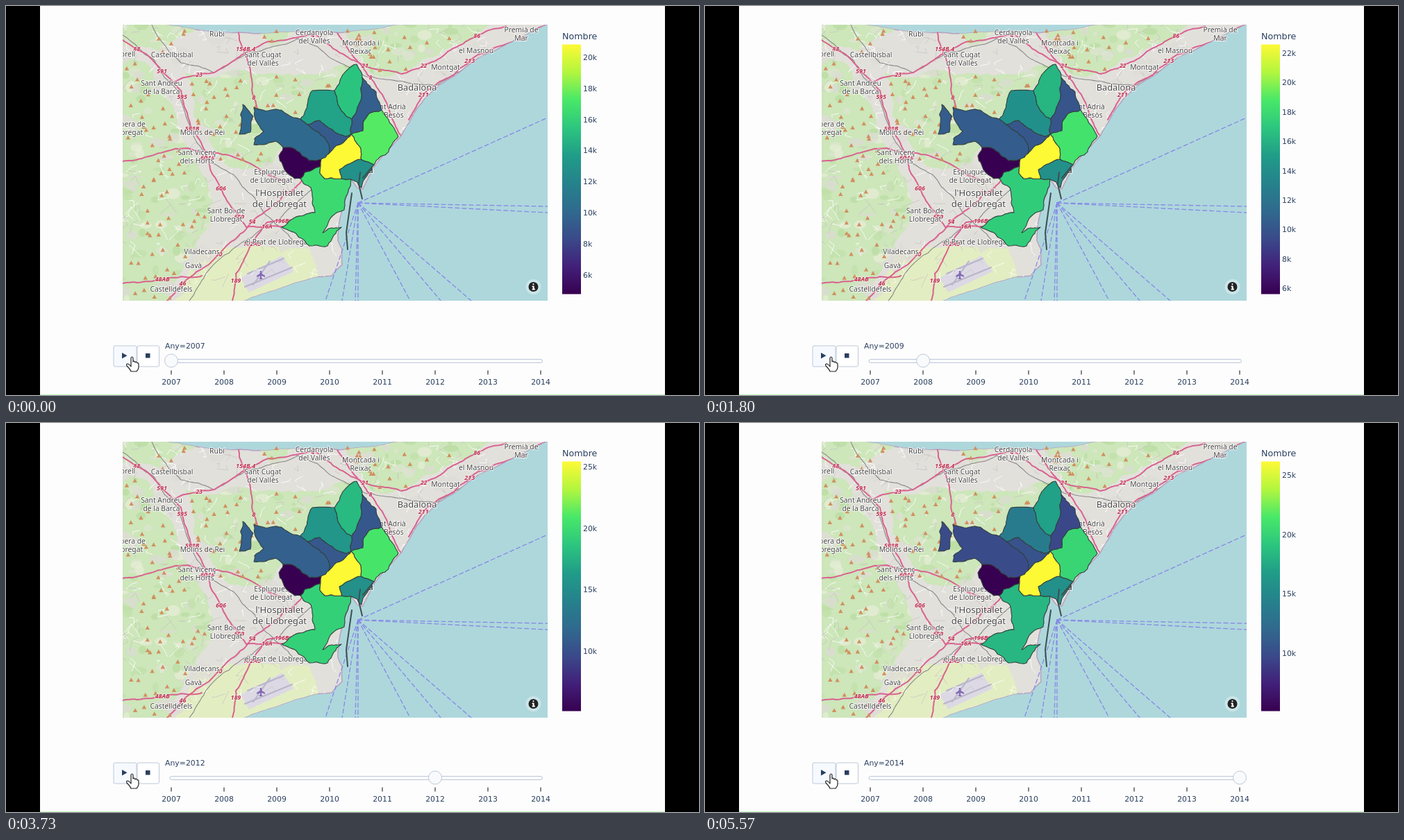
Write an HTML page that moves like this. It is 998 px wide and 561 px high and loops after 5610 ms.

```html
<!DOCTYPE html>
<html lang="ca">
<head>
<meta charset="utf-8">
<style>
  html, body { margin: 0; height: 100%; overflow: hidden; background: #000; }
  svg { display: block; width: 998px; height: 561px; }
  text { font-family: "DejaVu Sans", Verdana, sans-serif; font-size: 10.9px; fill: #2a3f5f; }
  .mid { text-anchor: middle; }
  #places text, #refs text { font-family: "Noto Sans", sans-serif; text-anchor: middle; paint-order: stroke; stroke-linejoin: round; }
  #places text { fill: #484848; stroke: #fffc; stroke-width: 2px; }
  #refs text { fill: #bd3050; stroke: #fff9; stroke-width: 1.6px; font: italic 600 9px "Noto Sans", sans-serif; }
  .line { fill: none; stroke-linejoin: round; stroke-linecap: round; }
  #districts path { stroke: #33413f; stroke-width: 1.1; stroke-linejoin: round; }
</style>
</head>
<body>
<svg viewBox="0 0 998 561">
  <defs>
    <clipPath id="frame"><path d="M168 27H780V425H168Z"/></clipPath>
    <clipPath id="inWoods"><use href="#woods"/></clipPath>
    <clipPath id="inLand"><use href="#land"/></clipPath>
    <linearGradient id="scale" x1="0" y1="1" x2="0" y2="0"></linearGradient>
  </defs>
  <path fill="#fdfdfd" d="M49 0H949V561H49Z"/>
  <path fill="#c4ffc0" d="M49 560H949V561H49Z"/>

  <g clip-path="url(#frame)">
    <path fill="#aed7dc" d="M168 27H780V425H168Z"/>
    <path id="land" fill="#e2e0db" stroke="#b5a2c0" stroke-width="1.5"/>
    <g clip-path="url(#inLand)">
      <path id="woods" fill="#cde6ba"/>
      <g id="patches" clip-path="url(#inWoods)"></g>
      <path id="delta" fill="#e3edc2"/>
      <g id="towns" fill="#dfdcd8" opacity=".8"></g>
      <path fill="#dcd9e5" d="M338 392 398 360 414 383 350 413Z"/>
      <path class="line" stroke="#b8b5ca" stroke-width="2" d="M344 405 412 377M348 386 400 364M356 402 380 368"/>
      <g id="streets" class="line" stroke-width=".8"></g>
      <g id="roads" class="line"></g>
    </g>
    <g id="peaks" fill="#d0905f"></g>
    <path fill="#8269b5" transform="translate(367 388)" d="M-1-6H1L1.5-2 6 1V3L1 1V4L3 6H-3L-1 4V1L-6 3V1L-1.5-2Z"/>
    <g id="refs"></g>
    <g id="places"></g>
    <g id="ferries" class="line" stroke="#8589e5" stroke-width="1.3" stroke-dasharray="6 4"></g>
    <g id="districts"></g>
    <path class="line" stroke="#3e5050" stroke-width="2" d="M510 240 508 257 513 278M498 270 490 327 492 351M528 231 514 248"/>
    <circle cx="759.5" cy="405" r="11" fill="#fff" opacity=".35"/>
    <circle cx="759.5" cy="405" r="7" fill="#222"/>
    <path class="line" stroke="#fff" stroke-width="2" d="M759.500 401V401.200M758.500 404.500H759.700V408.300M758.500 408.500H761"/>
  </g>

  <text x="801" y="48" style="font-size:12.7px">Nombre</text>
  <path fill="url(#scale)" d="M801 55.5H828V415.5H801Z"/>
  <g id="ticks"></g>

  <g stroke="#bec8d9">
    <rect x="155" y="490" width="33" height="30" rx="2" fill="#f6faff"/>
    <rect x="189" y="490" width="31.5" height="30" rx="2" fill="#fff"/>
    <rect x="236" y="509.5" width="536.5" height="5" rx="2.5" fill="#f8fafc"/>
  </g>
  <path fill="#2a3f5f" d="M167 500 174.5 504.2 167 508.5ZM201 501H207.500V507.500H201Z"/>
  <text id="label" x="229" y="494"></text>
  <g id="years"></g>
  <circle id="grip" cy="511.500" r="9.500" fill="#f8fafc" stroke="#bec8d9"/>
  <path fill="#fff" stroke="#222" stroke-width="1.2" stroke-linejoin="round" d="M180 518V508Q180 506 181.500 506T183 508V513Q185 511 186 514 188 512 189 515 191 514 191 517V521Q191 524 188 527H180Q179 524 174 519 173 516 175 516 177 516 180 520Z"/>
</svg>

<script>
const $ = id => document.getElementById(id);
const fill = (id, items, draw) => $(id).innerHTML = items.map(draw).join('');
const range = n => [...Array(n).keys()];
const clamp = (v, a, b) => Math.max(a, Math.min(b, v));
const points = s => s.split(' ').map(p => p.split(',').map(Number));

let seed = 7;
const rand = () => (seed = seed * 16807 % 2147483647) / 2147483647;
const between = (a, b) => (a + rand() * (b - a)).toFixed(1);
const pick = list => list[Math.floor(rand() * list.length)];

// Midpoint displacement that depends only on place, so neighbours share a border exactly
const noise = (x, y) => {
  const s = Math.sin(x * 12.9898 + y * 78.233) * 43758.5453;
  return s - Math.floor(s) - .5;
};
function rough([ax, ay], [bx, by], wobble) {
  const size = Math.hypot(bx - ax, by - ay), x = (ax + bx) / 2, y = (ay + by) / 2;
  if (size < 6) return [[bx, by]];
  const mid = [x + noise(x, y) * size * wobble, y + noise(y, x) * size * wobble];
  return [...rough([ax, ay], mid, wobble), ...rough(mid, [bx, by], wobble)];
}
function trace(list, wobble) {
  const line = list.slice(1).flatMap((p, i) => rough(list[i], p, wobble));
  return 'M' + [list[0], ...line].map(p => p.map(v => v.toFixed(1))).join(' ');
}
const area = (list, wobble = .22) => trace([...list, list[0]], wobble) + 'Z';

// Terrain
$('land').setAttribute('d', area(points('160,20 790,22 745,43 680,75 625,113 590,151 570,186 530,232 514,264 506,262 497,250 488,281 481,306 478,338 484,351 484,373 469,389 444,391 342,425 320,435 160,435'), .06));
$('woods').setAttribute('d', [
  '160,75 205,85 246,158 280,238 298,300 262,362 232,435 160,435',
  '258,96 345,93 480,85 505,84 425,160 380,236 320,232 270,160',
  '480,20 700,20 620,72 530,100',
  '160,20 285,20 224,66 160,58',
  '330,20 430,20 388,62'
].map(s => area(points(s))).join(''));
$('delta').setAttribute('d', area(points('276,354 352,346 437,350 450,390 342,430 240,430'), .1));

fill('patches', range(420), () =>
  `<ellipse cx="${between(168, 680)}" cy="${between(27, 425)}" rx="${between(2, 12)}" ry="${between(2, 8)}" fill="${pick(['#b9dda2', '#dfe6d2', '#e9eed9', '#c0e2aa', '#dddcd5'])}" opacity=".7"/>`);
fill('streets', range(420), () =>
  `<path stroke="${pick(['#fff', '#fff', '#c8c6c3'])}" d="M${between(168, 700)} ${between(27, 400)}l${between(-16, 16)} ${between(-14, 14)} ${between(-8, 8)} ${between(-8, 8)}"/>`);

const spot = $('woods').ownerSVGElement.createSVGPoint();
const inWoods = ([x, y]) => {
  spot.x = x;
  spot.y = y;
  return $('woods').isPointInFill(spot);
};
fill('peaks', range(420).map(() => [between(172, 660), between(30, 418)]).filter(inWoods),
  ([x, y]) => `<path d="M${x} ${y}l3.2 5.800h-6.400Z"/>`);

// Roads carry their numbers at equal distances
const roads = [
  ['168,42 248,124 290,220 420,345'],
  ['210,27 252,82 300,96 420,47 520,102 622,114 780,28'],
  ['264,425 330,348 454,252'],
  ['168,49 205,72 252,122 262,160 296,240 346,319 400,318', '88 591 595 598B 604A 606 609 16A'],
  ['232,425 292,373 344,324 430,246', '46 50 54 195B'],
  ['326,425 331,386 376,312 426,304', '189 192AB 196B'],
  ['168,224 226,211 262,205 328,218 400,252', ''],
  ['236,112 300,96 380,51 446,42 512,84 570,98 668,48 720,29', '23 4 4 21 22 86'],
  ['332,27 354,106 367,166', '154B 8'],
  ['471,27 516,92 552,151 568,186', '4 8 26'],
  ['580,164 600,130 680,70 780,27', '211 213 23'],
  ['168,400 220,395 282,389', '48AB']
];
fill('roads', roads, ([line, refs]) =>
  `<path stroke="${refs == null ? '#888' : '#d9628f'}" stroke-width="${refs == null ? 1.1 : 2}" d="${trace(points(line), .12)}"/>`);
$('refs').innerHTML = roads.map(([, refs], k) => {
  const path = $('roads').children[k], names = refs ? refs.split(' ') : [];
  return names.map((name, i) => {
    const { x, y } = path.getPointAtLength(path.getTotalLength() * (i + .5) / names.length);
    return `<text x="${x}" y="${y + 3}">${name}</text>`;
  }).join('');
}).join('');

const places = "Rubí,304,40|Cerdanyola/del Vallès,444,38|Montcada i/Reixac,511,53|Premià de/Mar,742,34|el Masnou,677,64|Montgat,633,88|Badalona,592,118,12.8|Sant Adrià/de Besòs,551,145|Castellbisbal,239,70|Sant Cugat/del Vallès,370,70|Martorell,164,69|Sant Andreu/de la Barca,224,111|Corbera de/Llobregat,174,170|Molins de Rei,283,182|Sant Vicenç/dels Horts,275,211|Esplugues/de Llobregat,382,239|l'Hospitalet/de Llobregat,394,269,13.2|Sant Boi de/Llobregat,317,295|el Prat de Llobregat,391,340|Viladecans,282,354|Gavà,270,374|Castelldefels,238,408|Barcelona,494,236,15"
  .split('|').map(s => s.split(','));
fill('places', places, ([name, x, y, size = 10.3]) => name.split('/').map((line, i) =>
  `<text x="${x}" y="${+y + i * size * 1.25}" dy=".35em" style="font-size:${size}px">${line}</text>`).join(''));
fill('towns', places, ([, x, y]) => `<path d="${area([[x - 22, y - 4], [+x, y - 13], [+x + 24, +y], [+x + 4, +y + 16]], .4)}"/>`);

fill('ferries', points('780,161 780,289 780,298 582,425 626,425 670,425 503,425 507,425 484,425 460,425'),
  ([x, y]) => `<path d="M507 284 ${x} ${y}"/>`);

// Districts: corners by letter, then outline, place on the scale and response to the yearly dip
const corners = Object.fromEntries(
  'A505,84 B513,103 C533,124 D541,150 E523,155 F565,188 G530,229 H511,221 I497,185 K514,180 L498,163 M509,140 N478,142 O473,122 P485,99 Q441,122 R424,163 S434,171 T452,165 U470,178 V489,188 W486,197 X465,213 Y463,196 Z454,221 a452,241 b453,231 c459,249 d483,249 e480,236 f511,206 g437,223 h417,207 i399,204 j388,195 k371,200 l357,200 m358,191 n371,181 o361,167 p357,146 q370,150 r396,150 s393,216 t401,236 u416,249 v424,249 w430,240 x439,262 y441,284 z445,298 0397,319 1437,346 2463,346 3483,319 4469,320 5456,327 6470,303 7487,294 8488,280 9497,250 @512,262 !341,142 #356,159 $352,182 %336,185'
    .split(' ').map(s => [s[0], s.slice(1).split(',').map(Number)]));
const districts = {
  'Sarrià': ['pqrRSYXZghijklmno !#$%', .33, 1],
  'Gràcia': ['STUVIWXY', .28, .3],
  'Horta': ['ONLIVUTSRQ', .57, 1.5],
  'Nou Barris': ['ABMLNOP', .66, .9],
  'Sant Andreu': ['BCDEKILM', .29, .7],
  'Sant Martí': ['EDFGHfIK', .79, .7],
  'Ciutat Vella': ['HG@9de', .5, 0],
  'Sants': ['bacd987654321' + '0zyxvw', .73, 1],
  'Les Corts': ['ihgZbwvuts', 0, 0],
  'Eixample': ['IfHedcabZXW', 1, 0]
};
const outline = names => names.split(' ').map(ring => area([...ring].map(c => corners[c]))).join('');
fill('districts', Object.values(districts), ([names]) => `<path d="${outline(names)}"/>`);

// Lowest and highest value in thousands and the dip of the middle values;
// a missing year lies halfway between its neighbours
const years = [[4.77, 20.82, 0], , [5.6, 22.6, .045], [6.22, 27.3, .065], , [5.17, 25.4, .03], , [5.12, 26.17, .105]];
const yearAt = i => years[i] || years[i - 1].map((v, k) => (v + years[i + 1][k]) / 2);

const stops = ['380050', '42207a', '3a4a8a', '306a8e', '25828c', '209d88', '2cc67e', '48e868', 'b2f63e', 'fdf935'];
const rgb = hex => [0, 2, 4].map(i => parseInt(hex.slice(i, i + 2), 16));
function color(v) {
  const i = Math.min(8, Math.floor(v * 9)), f = v * 9 - i, b = rgb(stops[i + 1]);
  return `rgb(${rgb(stops[i]).map((a, k) => Math.round(a + (b[k] - a) * f))})`;
}
fill('scale', stops, (c, i) => `<stop offset="${i / 9}" stop-color="#${c}"/>`);
fill('years', range(8), i =>
  `<path stroke="#333" stroke-width="1.2" d="M${238 + 76 * i} 525.500v6"/><text class="mid" x="${238 + 76 * i}" y="546">${2007 + i}</text>`);

let shown = -1;
function showYear(i) {
  if (i === shown) return;
  shown = i;
  const [low, high, dip] = yearAt(i);
  $('label').textContent = 'Any=' + (2007 + i);
  Object.values(districts).forEach(([, share, response], k) =>
    $('districts').children[k].setAttribute('fill', color(share - dip * response)));
  const step = high - low < 18 ? 2 : 5, first = Math.ceil(low / step) * step;
  fill('ticks', range(Math.floor((high - first) / step) + 1), k => {
    const v = first + k * step;
    return `<text x="831" y="${415.5 - 360 * (v - low) / (high - low)}" dy=".36em">${v}k</text>`;
  });
}

const LOOP = 5610, FIRST = 1260, STEP = 500, DELAY = 30, SLIDE = 150;
const ease = p => p < .5 ? 4 * p ** 3 : 1 - 4 * (1 - p) ** 3;
function draw(now) {
  const t = now % LOOP;
  const i = clamp(Math.floor((t - FIRST) / STEP) + 1, 0, 7);
  const p = (t - FIRST - (i - 1) * STEP - DELAY) / SLIDE;
  showYear(i);
  $('grip').setAttribute('cx', 238 + 76 * (i && i - 1 + ease(clamp(p, 0, 1))));
}
const start = performance.now();
function tick() {
  draw(performance.now() - start);
  requestAnimationFrame(tick);
}
tick();
</script>
</body>
</html>
```
